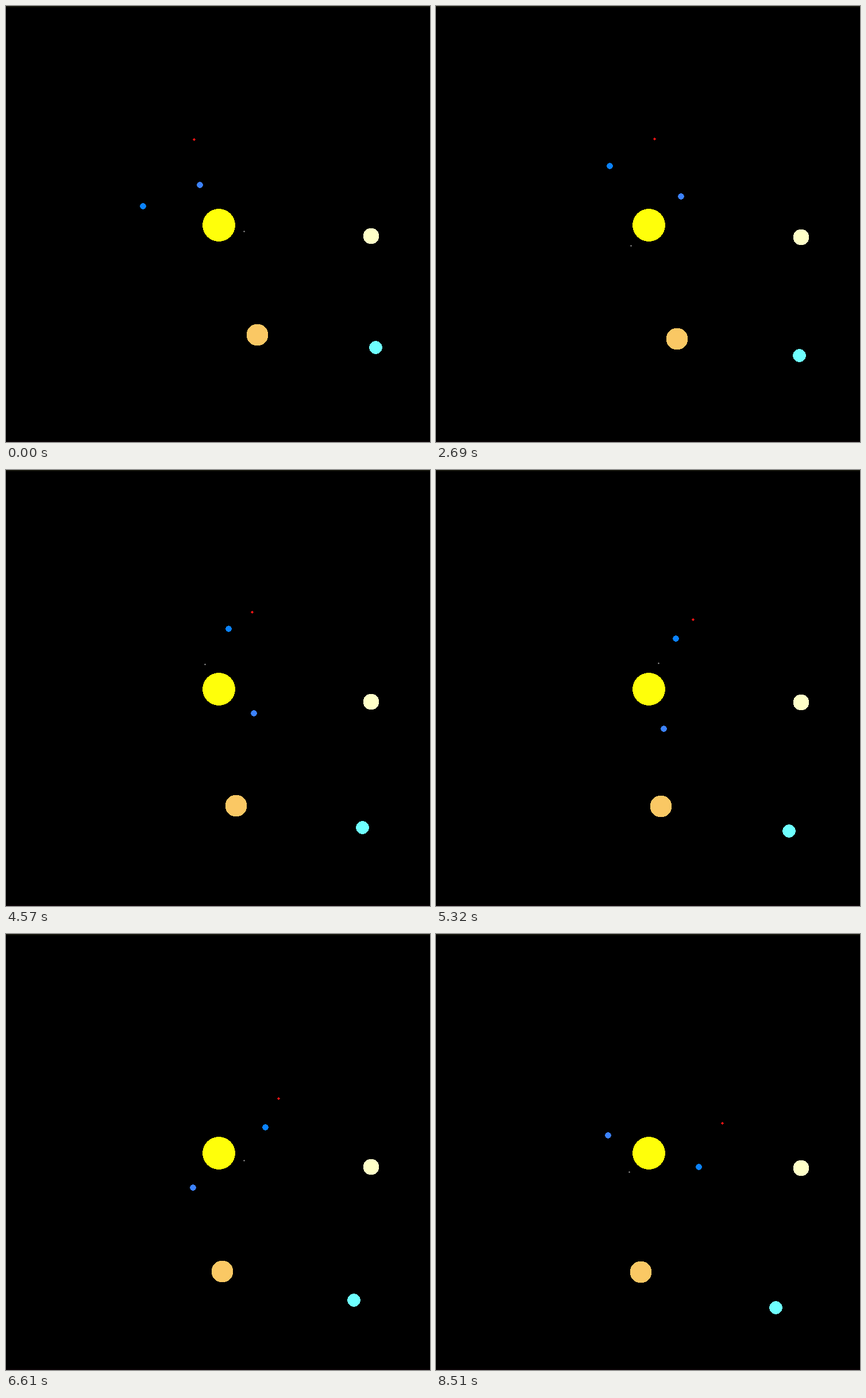
Animation, 738 px wide and 759 px high, one loop 8.54 s. Source, as an HTML page with a canvas:

```html
<!DOCTYPE html>
<html lang="en">
<head>
<meta charset="utf-8">
<title>Orbits</title>
<style>
  html, body { margin: 0; width: 100%; height: 100%; overflow: hidden; background: #000; }
  canvas { display: block; }
</style>
</head>
<body>
<canvas id="stage" width="738" height="759"></canvas>
<script>
const ctx = document.getElementById('stage').getContext('2d');
const LOOP = 8540;
const FOCUS = { x: 369.3, y: 380 };
const RAD = Math.PI / 180;

// Angles in degrees; rate is degrees per unit of phase.
const planets = [
  { color: '#888888', size: 1,    p: 47.4,  e: 0,     w: 0,    start: 15.6,  rate: 1.503 },
  { color: '#3c82ff', size: 5.2,  p: 75.5,  e: 0,     w: 0,    start: 244.7, rate: 1 },
  { color: '#0a82ff', size: 5.2,  p: 109.1, e: 0.198, w: -2,   start: 193.3, rate: 0.5755 },
  { color: '#fa1414', size: 2.2,  p: 148.6, e: 0.083, w: 6,    start: 254.3, rate: 0.265 },
  { color: '#fac864', size: 18.9, p: 208.5, e: 0.048, w: 4,    start: 70.5,  rate: 0.0725 },
  { color: '#ffffc8', size: 13.9, p: 267.4, e: 0,     w: 0,    start: 4.47,  rate: 0.0045 },
  { color: '#6effff', size: 11.3, p: 363.3, e: 0.047, w: 14.5, start: 38.03, rate: 0.0395 }
];

// [time, phase, steps until the next entry]; a single step is a hold.
const pace = [
  [0, 0, 1], [30, 2, 7], [580, 19, 1], [830, 20.5, 4], [1020, 26.5, 1],
  [1360, 28, 2], [1520, 32.3, 16], [2490, 73, 1], [2690, 75.1, 32],
  [3800, 118.2, 43], [5320, 184.3, 37], [6610, 241.1, 54], [8510, 318.1, 1],
  [LOOP, 318.1, 1]
];

function phaseAt(t) {
  let i = 0;
  while (i < pace.length - 2 && t >= pace[i + 1][0]) i++;
  const [t0, p0, steps] = pace[i];
  const [t1, p1] = pace[i + 1];
  const part = Math.floor((t - t0) / (t1 - t0) * steps + 1e-6) / steps;
  return p0 + (p1 - p0) * part;
}

// Disc with hard pixel edges.
function disc(x, y, r, color) {
  ctx.fillStyle = color;
  const cx = Math.floor(x), cy = Math.floor(y), n = Math.floor(r);
  for (let dy = -n; dy <= n; dy++) {
    const half = Math.floor(Math.sqrt(r * r - dy * dy));
    ctx.fillRect(cx - half, cy + dy, half * 2 + 1, 1);
  }
}

function drawPlanet(planet, phase) {
  const angle = planet.start + planet.rate * phase;
  const r = planet.p / (1 + planet.e * Math.cos((angle - planet.w) * RAD));
  const x = FOCUS.x + r * Math.cos(angle * RAD);
  const y = FOCUS.y + r * Math.sin(angle * RAD);
  disc(x, y, planet.size, planet.color);
}

function draw(t) {
  ctx.fillStyle = '#000';
  ctx.fillRect(0, 0, 738, 759);
  ctx.fillStyle = '#16160e';
  ctx.fillRect(0, 0, 738, 2);
  ctx.fillStyle = '#0c0408';
  ctx.fillRect(0, 757, 738, 2);
  disc(370.5, 381, 28.4, '#ffff0a');
  const phase = phaseAt(t);
  for (const planet of planets) drawPlanet(planet, phase);
}

function tick() {
  draw(performance.now() % LOOP);
  requestAnimationFrame(tick);
}
tick();
</script>
</body>
</html>
```
